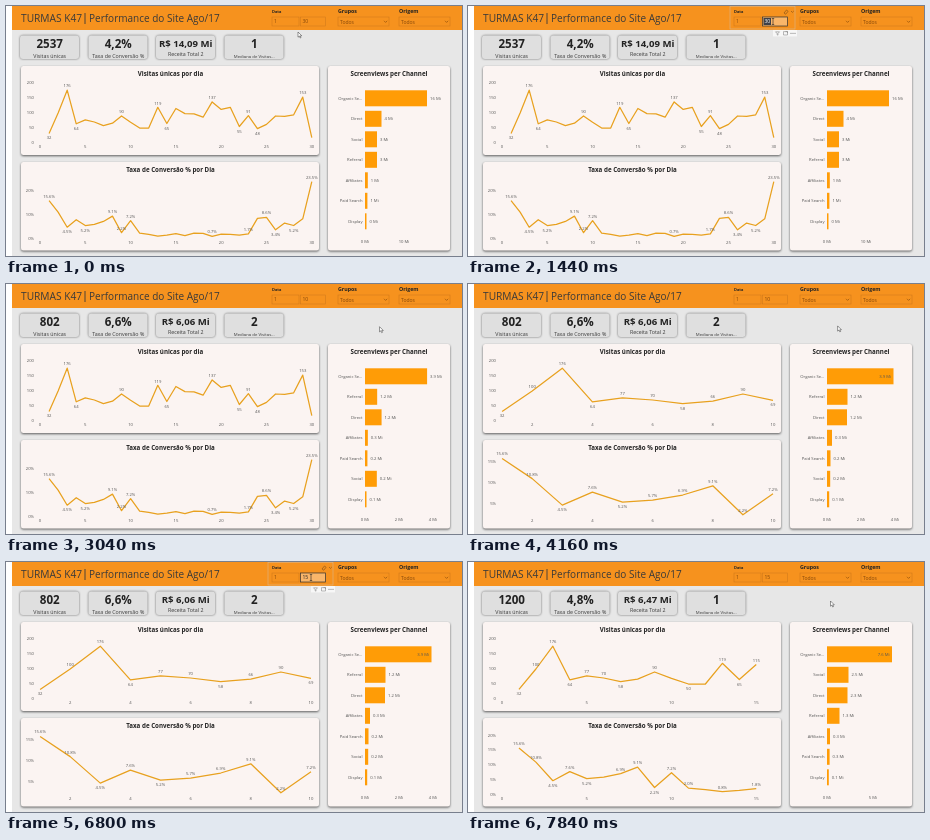
Animation, 456 px wide and 250 px high, one loop 8000 ms. Source, as an HTML page:

```html
<!DOCTYPE html>
<html lang="pt">
<head>
<meta charset="utf-8">
<title>Performance do Site</title>
<style>
  html, body { margin: 0; width: 100%; height: 100%; overflow: hidden; background: #fff; }
  svg { display: block; width: 100vw; height: 100vh; font-family: "Open Sans", "Noto Sans", sans-serif; fill: #3a3a3a; }
  .panel { fill: #fbf4f2; filter: drop-shadow(.6px 1px .9px #0009); }
  .card { fill: #dfdfdf; filter: drop-shadow(.4px .9px .8px #0008); }
  .line { fill: none; stroke: #e8a11f; stroke-width: 1.25; stroke-linejoin: round; }
  .b { font-weight: 700; fill: #222; }
  .mid { text-anchor: middle; }
  .end { text-anchor: end; }
  .small { font-size: 4.2px; fill: #555; }
  .slot { fill: none; stroke: #c9761a; stroke-width: .5; }
  .hint { fill: #84470a; font-size: 5px; }
</style>
</head>
<body>
<svg viewBox="0 0 456 250" preserveAspectRatio="none">
  <rect x="6" width="450" height="250" fill="#e7e7e7"/>
  <rect x="6" width="450" height="24" fill="#f6921e"/>
  <text x="15" y="15.7" font-size="10.2">TURMAS K47</text>
  <path d="M79 7V18" stroke="#3a3a3a" stroke-width=".9"/>
  <text x="83" y="15.7" font-size="10">Performance do Site Ago/17</text>
  <g id="slicers"></g>
  <g id="date"></g>
  <g id="panels"></g>
  <g id="cards"></g>
  <g id="axes"></g>
  <path id="visits" class="line"/>
  <path id="rate" class="line"/>
  <g id="labels"></g>
  <g id="bars"></g>
  <path id="arrow" d="M0 0V5.2L1.3 4.1L2.2 6L3 5.6L2.2 3.8H3.8Z" fill="#fff" stroke="#333" stroke-width=".5"/>
  <path id="beam" d="M-1.2 -3H1.2M0 -3V3M-1.2 3H1.2" fill="none" stroke="#222" stroke-width=".6"/>
</svg>
<script>
const LOOP = 8000;
const $ = id => document.getElementById(id);
const text = (x, y, s, cls = 'small', size = '') =>
  `<text x="${x}" y="${y}" class="${cls}"${size && ` font-size="${size}"`}>${s}</text>`;
const rect = (x, y, w, h, attrs) => `<rect x="${x}" y="${y}" width="${w}" height="${h}" ${attrs}/>`;
const lerp = (a, b, k) => a + (b - a) * k;
const clamp = k => Math.min(1, Math.max(0, k));
const ease = k => k < .5 ? 4 * k ** 3 : 1 - (2 - 2 * k) ** 3 / 2;
const smooth = k => k * k * (3 - 2 * k);

const visits = [32, 100, 176, 64, 77, 70, 58, 66, 90, 69, 50, 50, 119, 65, 115,
  98, 97, 86, 137, 112, 119, 55, 91, 48, 62, 90, 89, 94, 153, 18];
const rates = [15.6, 10.8, 4.5, 7.6, 5.2, 5.7, 6.9, 9.1, 2.2, 7.2, 2, 1.5, .8, 1.2, 1.8,
  1, 2, 1.9, .7, 1.6, 1.5, 1.2, 1.7, 8.2, 8.6, 3.4, 6.2, 5.2, 8, 23.5];

// up / down: days whose label sits above / below the point
const views = [
  { days: 30, x0: 34, dx: 9.06, ticks: [0, 5, 10, 15, 20, 25, 30],
    y0: 232, dy: 2.4, pct: [0, 10, 20],
    up: [3, 9, 13, 19, 23, 29], down: [1, 4, 14, 22, 24],
    rateUp: [1, 8, 9, 10, 19, 23, 25, 30], rateDown: [3, 5, 26, 28],
    cards: ['2537', '4,2%', 'R$ 14,09 Mi', '1'],
    names: ['Organic Se...', 'Direct', 'Social', 'Referral', 'Affiliates', 'Paid Search', 'Display'],
    mi: [16, 4, 3, 3, 1, 1, 0], widths: [62, 16.5, 12, 12, 2.8, 2.4, 1.5], axis: [[0, 359], [10, 398]] },
  { days: 10, x0: 4, dx: 30.1, ticks: [2, 4, 6, 8, 10],
    y0: 240, dy: 4.2, pct: [5, 10, 15],
    up: [2, 3, 5, 6, 8, 9], down: [1, 4, 7, 10],
    rateUp: [1, 2, 4, 6, 7, 8, 9, 10], rateDown: [3, 5],
    cards: ['802', '6,6%', 'R$ 6,06 Mi', '2'],
    names: ['Organic Se...', 'Referral', 'Direct', 'Affiliates', 'Paid Search', 'Social', 'Display'],
    mi: ['3.9', '1.2', '1.2', '0.3', '0.2', '0.2', '0.1'], widths: [66.5, 20.5, 20, 5, 3.5, 3.2, 2.2],
    axis: [[0, 359], [2, 393], [4, 427]] },
  { days: 15, x0: 34, dx: 16.95, ticks: [0, 5, 10, 15],
    y0: 232, dy: 2.95, pct: [0, 5, 10, 15, 20],
    up: [2, 3, 5, 6, 9, 13, 15], down: [1, 4, 7, 11, 14],
    rateUp: [1, 2, 4, 7, 8, 10, 11, 13, 15], rateDown: [3, 5, 9],
    cards: ['1200', '4,8%', 'R$ 6,47 Mi', '1'],
    names: ['Organic Se...', 'Social', 'Direct', 'Referral', 'Affiliates', 'Paid Search', 'Display'],
    mi: ['7.6', '2.5', '2.3', '1.3', '0.3', '0.3', '0.1'], widths: [65, 21.5, 20.5, 12.5, 3, 2.6, 1.8],
    axis: [[0, 359], [5, 405]] }
];
const xAt = (v, i) => v.x0 + v.dx * (i + 1);
const visitY = (v, i) => 137 - .3 * visits[i];
const rateY = (v, i) => v.y0 - v.dy * rates[i];

const cardX = [14, 82.5, 150, 218.5];
const captions = ['Visitas únicas', 'Taxa de Conversão %', 'Receita Total 2', 'Mediana de Visitas...'];

function drawStatic() {
  $('panels').innerHTML =
    [[15, 60, 298, 89], [15, 156, 298, 88.5], [322, 60, 122, 184.5]]
      .map(([x, y, w, h]) => rect(x, y, w, h, 'rx="2.5" class="panel"')).join('') +
    cardX.map(x => rect(x, 29.5, 59, 23.5, 'rx="3" class="card"')).join('') +
    text(164.5, 70.3, 'Visitas únicas por dia', 'b mid', 6.2) +
    text(164.5, 166.3, 'Taxa de Conversão % por Dia', 'b mid', 6.2) +
    text(383, 70.3, 'Screenviews per Channel', 'b mid', 6.2);
  $('slicers').innerHTML = text(266, 7, 'Data', 'b', 3.9) +
    [[332, 'Grupos'], [393, 'Origem']].map(([x, s]) =>
      text(x, 7, s, 'b', 5.3) + rect(x, 11, 51, 9, 'class="slot"') + text(x + 2, 17.6, 'Todos', 'hint') +
      `<path d="M${x + 46} 14.8l1.6 1.6l1.6 -1.6" fill="none" stroke="#84470a" stroke-width=".6"/>`).join('');
}

function drawCards(v) {
  $('cards').innerHTML = v.cards.map((s, i) => {
    const x = cardX[i] + 29.7, wide = i === 2;
    return text(x, wide ? 41 : 42, s, 'b mid', wide ? 9.6 : 11.6) +
      text(x, wide ? 50.3 : 51.5, captions[i], 'mid', i === 3 ? 4.3 : 5.3);
  }).join('');
}

function drawLabels(v) {
  let axes = [0, 50, 100, 150, 200].map(n => text(28, 138 - .3 * n, n, 'small end')).join('');
  axes += v.pct.map(n => text(28, v.y0 + 1.5 - v.dy * n, n + '%', 'small end')).join('');
  axes += v.ticks.map(n => [141.7, 237.5].map(y => text(v.x0 + v.dx * n, y, n, 'small mid')).join('')).join('');
  $('axes').innerHTML = axes;
  const tags = (days, y, off, fmt) => days.map(d =>
    text(xAt(v, d - 1), y(v, d - 1) + off, fmt(d - 1), 'small mid')).join('');
  const count = i => visits[i], pct = i => rates[i].toFixed(1) + '%';
  $('labels').innerHTML = tags(v.up, visitY, -2.8, count) + tags(v.down, visitY, 6, count) +
    tags(v.rateUp, rateY, -3, pct) + tags(v.rateDown, rateY, 6, pct);
}

function drawLine(id, a, b, k, y) {
  const pts = [];
  for (let i = 0; i < b.days; i++) {
    const from = i < a.days ? a : b;
    pts.push(lerp(xAt(from, i), xAt(b, i), k).toFixed(2) + ' ' + lerp(y(from, i), y(b, i), k).toFixed(2));
  }
  $(id).setAttribute('d', 'M' + pts.join('L'));
}

function drawBars(a, b, k) {
  $('bars').innerHTML = b.names.map((name, i) => {
    const prev = a.widths[a.names.indexOf(name)];
    const w = lerp(prev, b.widths[i], k), y = 92.3 + 20.5 * i;
    const inside = w > 63;
    return text(356.5, y + 1.6, name, 'small end') +
      rect(359, y - 8, w, 16, 'fill="#ff9c06"') +
      text(359 + w + (inside ? -2.5 : 3), y + 1.6, b.mi[i] + ' Mi', inside ? 'small end' : 'small');
  }).join('') + b.axis.map(([n, x]) => text(x, 237.3, n + ' Mi', 'small mid')).join('');
}

function drawDate(t) {
  const hover = t > 640 && t < 2240 || t > 4400 && t < 7120;
  const focus = t >= 1200 && t < 2080 || t >= 4960 && t < 6840;
  const picked = t >= 1200 && t < 1560 || t >= 4960 && t < 6080;
  const value = t < 1560 ? '30' : t < 1720 ? '1' : t < 6080 ? '10' : t < 6480 ? '1' : '15';
  let s = rect(266, 11, 27, 9, 'class="slot"') + rect(294.5, 11, 25, 9, 'class="slot"') +
    text(268, 17.4, '1', 'hint');
  if (hover) {
    s += rect(262, .4, 65, 22.6, 'fill="none" stroke="#d9b48a" stroke-width=".6"') +
      '<path d="M316 7l2.5 -3l1.6 1.3l-2.4 2.9zM323 5l1.4 1.4l1.4 -1.4" fill="none" stroke="#7a4a18" stroke-width=".6"/>' +
      rect(305, 24, 24, 6.4, 'fill="#f7f7f7"') +
      '<path d="M307.5 25.8h4l-1.5 1.6v1.8l-1 -.6v-1.2zM315.5 25.6h4v3.4h-4zM317.5 25.6h2v1.6" fill="none" stroke="#777" stroke-width=".5"/>' +
      [323, 325, 327].map(x => `<circle cx="${x}" cy="27.3" r=".55" fill="#666"/>`).join('');
  }
  if (focus) s += rect(294.5, 11, 25, 9, 'fill="#f9b66a" stroke="#333" stroke-width=".7"');
  if (picked) s += rect(295.5, 12, 7.5, 7, 'fill="#3d4048"');
  s += `<text x="296.4" y="17.4" font-size="5" fill="${picked ? '#fff' : focus ? '#222' : '#84470a'}">${value}</text>`;
  $('date').innerHTML = s;
}

const path = [[0, 292, 26], [80, 292, 26], [880, 305, 15.5], [2000, 305, 15.5], [2640, 373.5, 42.5],
  [4080, 373.5, 43.5], [4640, 305, 15.5], [7040, 305, 15.5], [7360, 362.5, 39], [LOOP, 362.5, 39]];

function drawCursor(t) {
  const i = path.findIndex(p => p[0] > t);
  const [t0, x0, y0] = path[i - 1], [t1, x1, y1] = path[i];
  const k = smooth((t - t0) / (t1 - t0));
  const x = lerp(x0, x1, k), y = lerp(y0, y1, k);
  const typing = x < 319 && x > 294 && y < 20;
  $('arrow').style.display = typing ? 'none' : '';
  $('beam').style.display = typing ? '' : 'none';
  $(typing ? 'beam' : 'arrow').setAttribute('transform', `translate(${x.toFixed(2)} ${y.toFixed(2)})`);
}

// bars and cards refresh first, the lines follow
const changes = [{ bars: 3000, lines: 3140 }, { bars: 7240, lines: 7380 }];
const shown = {};
function once(key, value, draw) {
  if (shown[key] !== value) { shown[key] = value; draw(); }
}
function stage(t, part, length) {
  const n = changes.filter(c => t >= c[part]).length;
  return { n, a: views[Math.max(0, n - 1)], b: views[n],
    k: n ? ease(clamp((t - changes[n - 1][part]) / length)) : 1 };
}

function render(t) {
  const bars = stage(t, 'bars', 240), lines = stage(t, 'lines', 420);
  once('cards', bars.n, () => drawCards(bars.b));
  once('labels', lines.n, () => drawLabels(lines.b));
  once('bars', bars.n + bars.k / 2, () => drawBars(bars.a, bars.b, bars.k));
  drawLine('visits', lines.a, lines.b, lines.k, visitY);
  drawLine('rate', lines.a, lines.b, lines.k, rateY);
  drawDate(t);
  drawCursor(t);
}

function tick() {
  render(performance.now() % LOOP);
  requestAnimationFrame(tick);
}
drawStatic();
tick();
</script>
</body>
</html>
```
